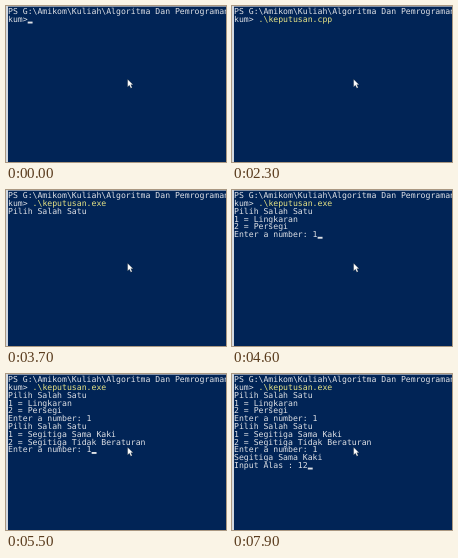
An HTML page that plays this animation: 220x156 px, repeating every 8 s.

```html
<!DOCTYPE html>
<html lang="id">
<head>
<meta charset="utf-8">
<title>Terminal</title>
<style>
  html, body { margin: 0; width: 100%; height: 100%; overflow: hidden; background: #012456; }
  svg { display: block; width: 220px; height: 156px; }
  text {
    font: 8.17px "DejaVu Sans Mono", "Liberation Mono", monospace;
    fill: #dfe1e6;
    white-space: pre;
    text-rendering: geometricPrecision;
  }
  .command { fill: #e8e486; }
</style>
</head>
<body>
<svg viewBox="0 0 220 156">
  <rect width="220" height="156" fill="#012456"/>
  <rect width="220" height="1" fill="#8793a6"/>
  <rect width="2" height="156" fill="#d3d8df"/>
  <g id="screen"></g>
  <rect id="caret" width="4.9" height="1.9" fill="#dfe1e6"/>
  <path d="M121.6 73.2v7.7l1.8-1.6 1.4 2.9 1.4-.7-1.4-2.8h2.3z" fill="#fff" stroke="#101820" stroke-width=".3"/>
</svg>
<script>
const LOOP = 8000, LEFT = 2, ADVANCE = 4.92, PITCH = 7.8, BASELINE = 8.2;
const PROMPT = 'kum>', ASK = 'Enter a number: ', INPUT = 'Input Alas : ';

const lines = [
  'PS G:\\Amikom\\Kuliah\\Algoritma Dan Pemrograman',
  PROMPT + ' .\\keputusan.exe',
  'Pilih Salah Satu',
  '1 = Lingkaran',
  '2 = Persegi',
  ASK + '1',
  'Pilih Salah Satu',
  '1 = Segitiga Sama Kaki',
  '2 = Segitiga Tidak Beraturan',
  ASK + '1',
  'Segitiga Sama Kaki',
  INPUT
];

// start time, current row, its text, caret visible
const steps = [
  [0, 1, PROMPT, true],
  [100, 1, PROMPT, false],
  [600, 1, PROMPT, true],
  [1100, 1, PROMPT, false],
  [1200, 1, PROMPT + ' k', true],
  [1600, 1, PROMPT + ' ke', true],
  [1800, 1, PROMPT + ' kep', false],
  [2300, 1, PROMPT + ' .\\keputusan.cpp', false],
  [2800, 1, PROMPT + ' .\\keputusan.cpp', true],
  [2900, 1, PROMPT + ' .\\keputusan.exe', false],
  [3400, 2, '', true],
  [3700, 2, lines[2], false],
  [3800, 5, ASK, false],
  [3900, 5, ASK, true],
  [4400, 5, ASK, false],
  [4600, 5, ASK + '1', true],
  [4800, 9, ASK, true],
  [5500, 9, ASK + '1', true],
  [5800, 11, INPUT, true],
  [6500, 11, INPUT, false],
  [6900, 11, INPUT, true],
  [7500, 11, INPUT, false],
  [7800, 11, INPUT + '1', true],
  [7900, 11, INPUT + '12', true]
];

const screen = document.getElementById('screen');
const caret = document.getElementById('caret');

function svg(tag, parent) {
  return parent.appendChild(document.createElementNS('http://www.w3.org/2000/svg', tag));
}

const rows = lines.map((_, i) => {
  const text = svg('text', screen);
  text.setAttribute('x', LEFT);
  text.setAttribute('y', BASELINE + i * PITCH);
  const plain = svg('tspan', text);
  const command = svg('tspan', text);
  command.setAttribute('class', 'command');
  return { plain, command };
});

function write(i, text) {
  const split = i === 1 ? PROMPT.length : text.length;
  rows[i].plain.textContent = text.slice(0, split);
  rows[i].command.textContent = text.slice(split);
}

function show([, row, text, caretOn]) {
  lines.forEach((line, i) => write(i, i < row ? line : i === row ? text : ''));
  caret.setAttribute('x', LEFT + text.length * ADVANCE);
  caret.setAttribute('y', 15.6 + (row - 1) * PITCH);
  caret.setAttribute('visibility', caretOn ? 'visible' : 'hidden');
}

const start = performance.now();
let current;

function tick() {
  const time = (performance.now() - start) % LOOP;
  const step = steps.filter(s => s[0] <= time).pop();
  if (step !== current) show(current = step);
  requestAnimationFrame(tick);
}
tick();
</script>
</body>
</html>
```
